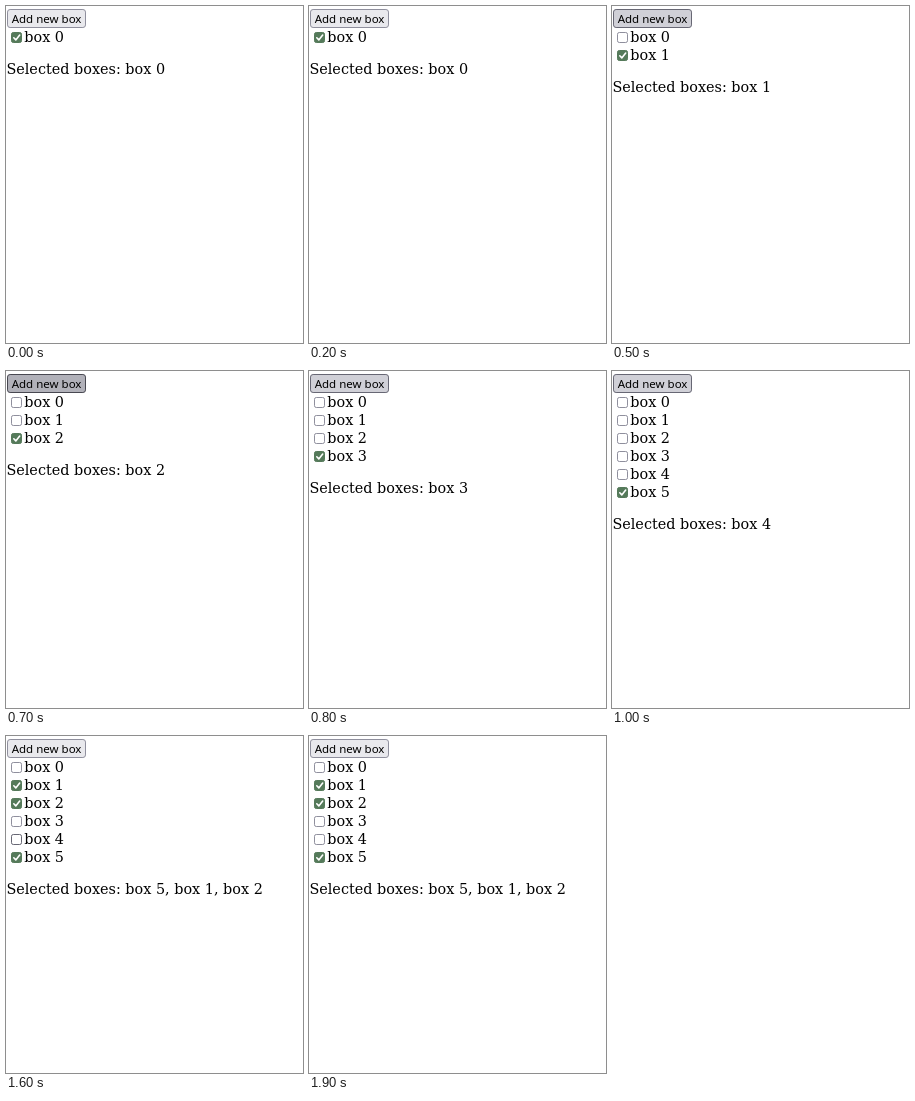
Recreate the animation shown at these times as an HTML page. Size 297 by 337 pixels, loop 2000 ms.

```html
<!DOCTYPE html>
<html lang="en">
<head>
<meta charset="utf-8">
<title>Add new box</title>
<style>
  html, body { margin: 0; width: 100%; height: 100%; overflow: hidden; background: #fff; }
  svg { display: block; width: 100%; height: 100%; }
  text { font: 14.4px "DejaVu Serif", serif; fill: #000; white-space: pre; }
  .caption { font: 500 11.5px "Noto Sans", "Open Sans", sans-serif; }
</style>
</head>
<body>
<svg viewBox="0 0 297 337">
  <rect id="button" x="1.5" y="3.5" width="78" height="18" rx="2.6"/>
  <text class="caption" x="5.7" y="17">Add new box</text>
  <g id="list"></g>
  <text id="summary" x="0.4"></text>
</svg>
<script>
const LOOP = 2000, ROW = 18, MAX = 6;
const $ = id => document.getElementById(id);

const BUTTON = {
  idle: ['#e9e9ed', '#8f8f9d'],
  hover: ['#d0d0d7', '#676774'],
  down: ['#b1b1b9', '#484851']
};

// Each state holds from `at` (ms): button look, row count, checked rows, hovered row
const states = [
  { at: 0, look: 'idle', rows: 1, on: [0] },
  { at: 300, look: 'hover', rows: 1, on: [0] },
  { at: 400, look: 'down', rows: 1, on: [0] },
  { at: 500, look: 'hover', rows: 2, on: [1] },
  { at: 600, look: 'down', rows: 2, on: [1] },
  { at: 700, look: 'down', rows: 3, on: [2] },
  { at: 800, look: 'hover', rows: 4, on: [3] },
  { at: 900, look: 'down', rows: 5, on: [4] },
  { at: 1000, look: 'hover', rows: 6, on: [5], listed: [4] },
  { at: 1100, look: 'hover', rows: 6, on: [5] },
  { at: 1200, look: 'idle', rows: 6, on: [5] },
  { at: 1300, look: 'idle', rows: 6, on: [5], over: 1 },
  { at: 1400, look: 'idle', rows: 6, on: [5, 1], over: 1 },
  { at: 1500, look: 'idle', rows: 6, on: [5, 1], over: 2 },
  { at: 1600, look: 'idle', rows: 6, on: [5, 1, 2], over: 4 },
  { at: 1800, look: 'idle', rows: 6, on: [5, 1, 2] }
];

function make(tag, attrs, parent) {
  const el = document.createElementNS('http://www.w3.org/2000/svg', tag);
  set(el, attrs);
  return parent.appendChild(el);
}

function set(el, attrs) {
  for (const key in attrs) el.setAttribute(key, attrs[key]);
}

const rows = Array.from({ length: MAX }, (_, i) => {
  const g = make('g', { transform: `translate(0 ${i * ROW})` }, $('list'));
  const box = make('rect', { x: 5.5, y: 26.5, width: 10, height: 10, rx: 1.8 }, g);
  const tick = make('path', {
    d: 'M7.8 31.8l2 2.1 3.9-4.8', fill: 'none', stroke: '#fff',
    'stroke-width': 1.6, 'stroke-linecap': 'round', 'stroke-linejoin': 'round'
  }, g);
  make('text', { x: 18.3, y: 36 }, g).textContent = 'box ' + i;
  return { g, box, tick };
});

function draw(t) {
  const s = states.filter(state => state.at <= t).pop();
  const [fill, stroke] = BUTTON[s.look];
  set($('button'), { fill, stroke });
  rows.forEach(({ g, box, tick }, i) => {
    const on = s.on.includes(i);
    const edge = s.over === i ? '#676774' : '#8f8f9d';
    set(g, { visibility: i < s.rows ? 'visible' : 'hidden' });
    set(box, { fill: on ? '#557a5a' : '#fff', stroke: on ? '#557a5a' : edge });
    set(tick, { opacity: on ? 1 : 0 });
  });
  set($('summary'), { y: 50 + s.rows * ROW });
  $('summary').textContent =
    'Selected boxes: ' + (s.listed || s.on).map(i => 'box ' + i).join(', ');
}

function tick() {
  draw(performance.now() % LOOP);
  requestAnimationFrame(tick);
}
tick();
</script>
</body>
</html>
```
